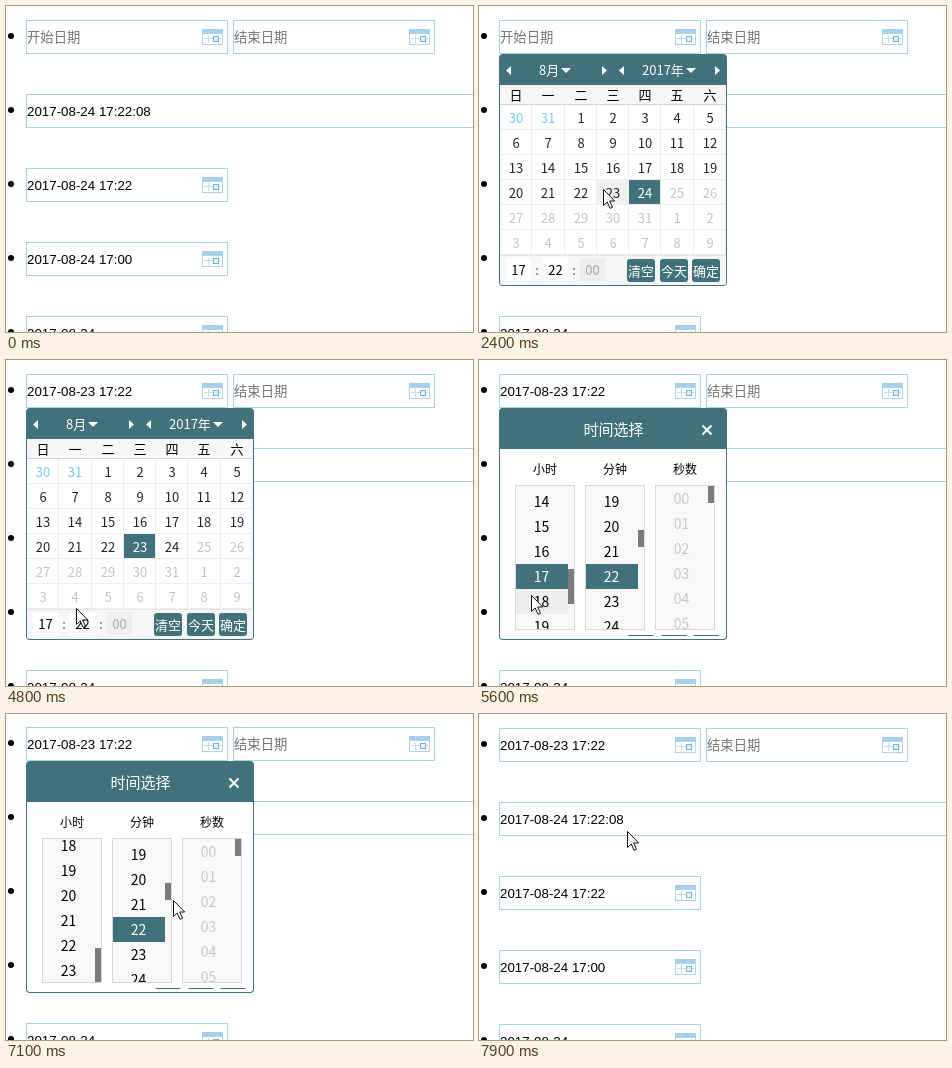
Write an HTML page that moves like this. It is 467 px wide and 326 px high and loops after 8000 ms.

```html
<!DOCTYPE html>
<html lang="zh">
<meta charset="utf-8">
<title>日期选择</title>
<style>
html, body { margin: 0; width: 100%; height: 100%; overflow: hidden; background: #fff; }
svg { display: block; }
text { font-family: "Noto Sans CJK SC", "Noto Sans CJK", "Noto Sans", sans-serif; white-space: pre; }
.field { font-family: "Liberation Sans", "Noto Sans CJK SC", "Noto Sans CJK", sans-serif; }
</style>
<svg id="stage" width="467" height="326" viewBox="0 0 467 326"></svg>
<script>
const stage = document.getElementById('stage');
const LOOP = 8000, STEP = 100, TEAL = '#41727c', LINE = '#a8d4e6';

// pointer moves: start, duration, end x, end y
const moves = [
  [100, 200, 303, 82], [300, 300, 169, 35], [900, 300, 95, 155], [1200, 200, 63, 188],
  [1800, 200, 138, 198], [2100, 300, 124, 183], [2600, 200, 165, 209], [2900, 300, 283, 213],
  [3300, 600, 114, 46], [4400, 400, 70, 248], [4800, 500, 39, 255], [5400, 900, 73, 204],
  [6300, 100, 75, 192], [6400, 200, 93, 189], [6700, 300, 167, 186], [7100, 800, 148, 117]];

const progress = (t, start, length) => Math.min(1, Math.max(0, (t - start) / length));
// smooth at both ends
const glide = (t, start, length) => {
  const u = progress(t, start, length);
  return u ** 3 * (u * (6 * u - 15) + 10);
};

function pointerAt(t) {
  let x = 440, y = 56;
  for (const [start, length, toX, toY] of moves) {
    const u = 1 - (1 - progress(t, start, length)) ** 2;
    x += (toX - x) * u;
    y += (toY - y) * u;
  }
  return [Math.round(x), Math.round(y)];
}

const box = (x, y, w, h, fill, r = 0) =>
  `<rect x="${x}" y="${y}" width="${w}" height="${h}" rx="${r}" fill="${fill}"/>`;
const frame = (x, y, w, h, color) =>
  `<rect x="${x + .5}" y="${y + .5}" width="${w - 1}" height="${h - 1}" fill="#fff" stroke="${color}"/>`;
const shape = (d, fill) => `<path d="${d}" fill="${fill}"/>`;
// y is the middle of the line
const text = (x, y, s, size = 13, fill = '#000', anchor = 'middle', cls = '') =>
  `<text x="${x}" y="${Math.round(y + size * .37)}" font-size="${size}" fill="${fill}" text-anchor="${anchor}" class="${cls}">${s}</text>`;

function icon(x, y) {
  return box(x, y, 21, 4, '#a5cfec') + frame(x, y + 4, 21, 12, '#b0d3ea') +
    `<path d="M${x + 2} ${y + 9.5}h17M${x + 6.5} ${y + 6}v8M${x + 16.5} ${y + 6}v8" stroke="#c2deee"/>` +
    `<rect x="${x + 11.5}" y="${y + 7.5}" width="5" height="5" fill="#e4f2fa" stroke="#6fb3de"/>`;
}

function field(x, y, s, w = 202, hint = false) {
  return frame(x, y, w, 34, LINE) + icon(x + w - 26, y + 9) +
    text(x + 1, y + 17, s, 13.333, hint ? '#757575' : '#000', 'start', 'field');
}

function form(t) {
  const rows = ['2017-08-24 17:22:08', '2017-08-24 17:22', '2017-08-24 17:00', '2017-08-24', '2017-08'];
  let out = t < 2600 ? field(20, 14, '开始日期', 202, true) : field(20, 14, '2017-08-23 17:22');
  out += field(227, 14, '结束日期', 202, true);
  rows.forEach((s, i) => out += field(20, 88 + 74 * i, s, i ? 202 : 600));
  for (let i = 0; i < 6; i++) out += `<circle cx="5" cy="${30 + 74 * i}" r="3"/>`;
  return out;
}

const buttons = () => ['清空', '今天', '确定'].map((s, i) => {
  const x = Math.round(128 + 32.5 * i);
  return box(x, 205, 28, 23, TEAL, 3) + text(x + 14, 217, s, 13, '#fff');
}).join('');

const panel = top => box(0, 0, 228, 232, TEAL, 4) + box(1, top, 226, 231 - top, '#fff', 3);

function calendar({ picked, min = -9, max = 99 }, mx, my) {
  const left = i => Math.round(1 + i * 226 / 7);
  let out = panel(31) + box(1, 31, 226, 19, '#f7f7f7') + box(1, 50, 226, 1, '#d4d4d4');
  ['8月', '2017年'].forEach((s, i) => {
    const x = 7 + 113 * i, drop = 62 + 125 * i;
    out += shape(`M${x} 16.5l5-4.5v9z`, '#fff') + shape(`M${x + 101} 16.5l-5-4.5v9z`, '#fff') +
      text(40 + 103 * i, 16, s, 13, '#fff', 'start') + shape(`M${drop} 14h10l-5 5z`, '#fff');
  });
  [...'日一二三四五六'].forEach((s, i) => out += text(left(i) + 16, 41, s));
  for (let i = 0; i < 42; i++) {
    const day = i - 1, x = left(i % 7), y = 51 + 25 * Math.floor(i / 7), w = left(i % 7 + 1) - x;
    const off = day < min || day > max, other = day < 1 || day > 31;
    const over = mx >= x && mx < x + w && my >= y && my < y + 25;
    out += box(x + w - 1, y, 1, 25, '#eee') + box(x, y + 24, w, 1, '#eee');
    if (day === picked) out += box(x, y, w - 1, 24, TEAL);
    else if (over && !off) out += box(x, y, w, 25, '#f0f0f0');
    const ink = day === picked ? '#fff' : off ? '#c3c3c3' : other ? '#6dd0ee' : '#222';
    out += text(x + 16, y + 13, (day + 30) % 31 + 1, 13, ink);
  }
  out += box(1, 201, 226, 30, '#f7f7f7', 3) + box(1, 201, 226, 1, '#e4e4e4');
  ['17', '22', '00'].forEach((s, i) => {
    const x = 7 + 37 * i, last = i === 2;
    out += box(x, 204, 25, 23, last ? '#eee' : '#fff') + text(x + 12.5, 216, s, 13, last ? '#aaa' : '#000');
    if (!last) out += text(x + 31, 216, ':', 13, '#555');
  });
  return out + buttons();
}

function list(x, name, count, scroll, picked, off, mx, my) {
  const thumb = Math.max(17, Math.round(144 * 144 / (count * 25)));
  const pos = scroll / (count * 25 - 144) * (144 - thumb);
  const inside = mx > x && mx < x + 53 && my >= 78 && my < 222;
  const over = inside ? Math.floor((my - 78 + scroll) / 25) : -1;
  let rows = '';
  for (let n = Math.floor(scroll / 25); n < count && n * 25 < scroll + 144; n++) {
    const y = n * 25 - scroll;
    if (n === picked) rows += box(0, y, 52, 25, TEAL);
    else if (n === over && !off) rows += box(0, y, 52, 25, '#eee');
    rows += text(25.5, y + 13, String(n).padStart(2, '0'), 14, off ? '#c8c8c8' : n === picked ? '#fff' : '#000');
  }
  return text(x + 30, 62, name, 12) + frame(x, 77, 60, 145, '#d8d8d8') +
    `<svg x="${x + 1}" y="78" width="58" height="143">` + box(0, 0, 58, 144, '#f8f8f8') + rows +
    box(52, Math.round(pos), 6, thumb, '#7b7b7b') + '</svg>';
}

function clock(t, mx, my) {
  const hourScroll = Math.round(347 + 109 * glide(t, 6100, 200));
  return panel(41) + buttons() + box(1, 41, 226, 186, '#fff') +
    text(114.5, 21, '时间选择', 15, '#fff') +
    '<path d="M203.5 17.5l9 9m0-9l-9 9" stroke="#fff" stroke-width="2"/>' +
    list(16, '小时', 24, hourScroll, 17, false, mx, my) +
    list(86, '分钟', 60, 472, 22, false, mx, my) +
    list(156, '秒数', 60, 0, -1, true, mx, my);
}

function popup(t) {
  if (t < 800 || t >= 2600 && t < 2800 || t >= 7500) return '';
  const x = t >= 2800 && t < 4200 ? 227 : 20;
  // hover follows the pointer one step late
  const [px, py] = pointerAt(t - STEP), mx = px - x, my = py - 48;
  const options = t < 2600 ? { picked: 24, max: 24 } : t < 4200 ? { picked: 24, min: 23 } : { picked: 23, max: 24 };
  const body = t < 5400 ? calendar(options, mx, my) : clock(t, mx, my);
  return `<g transform="translate(${x} 48)">${body}</g>`;
}

function pointer(t) {
  if (t < 100) return '';
  const [x, y] = pointerAt(t);
  return `<path transform="translate(${x + .5} ${y + .5})" d="M0 0v16l3.7-3.5 2.8 6.3 2.5-1-2.8-6.3h5z" fill="#fff" stroke="#111"/>`;
}

let shown = -1;
function tick(now) {
  const t = Math.floor(now % LOOP / STEP) * STEP;
  if (t !== shown) {
    shown = t;
    const scroll = Math.round(98 * (glide(t, 7060, 340) - glide(t, 7600, 300)));
    stage.innerHTML = `<g transform="translate(0 ${-scroll})">${form(t)}${popup(t)}</g>${pointer(t)}`;
  }
  requestAnimationFrame(tick);
}
tick(performance.now());
</script>
</html>
```
